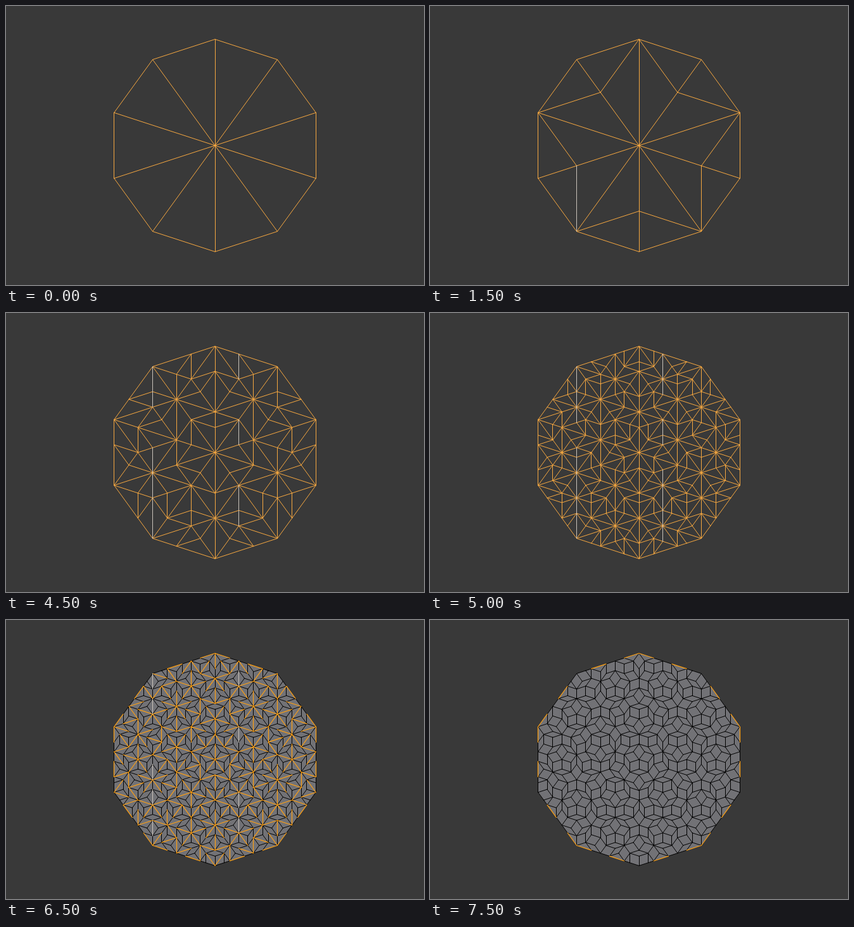
Animation of 660x440 px, one loop 8 s. Source, as an HTML page with a canvas:

```html
<!DOCTYPE html>
<html lang="en">
<head>
<meta charset="utf-8">
<title>Penrose tiling by triangle subdivision</title>
<style>
html, body { margin: 0; width: 100%; height: 100%; overflow: hidden; background: #393939; }
canvas { display: block; }
</style>
</head>
<body>
<canvas id="stage" width="660" height="440"></canvas>
<script>
const ctx = document.getElementById('stage').getContext('2d');
const PHI = (1 + Math.sqrt(5)) / 2;
const CX = 330, CY = 220, RADIUS = 167.5;
const LOOP = 8000;
const STARTS = [0, 1500, 3000, 4500, 5000, 5500, 6500, 7500];
const LAST_LEVEL = 5;
const BG = '#393939', WIRE = '#f5a740', PICK = '#ffa012', PALE = '#c9c2ba';
const FACE = '#727276', INK = '#000';

const rim = i => {
  const a = i * Math.PI / 5;
  return [CX + RADIUS * Math.sin(a), CY - RADIUS * Math.cos(a)];
};
const golden = (p, q) => [p[0] + (q[0] - p[0]) / PHI, p[1] + (q[1] - p[1]) / PHI];

// Triangles are [thick, apex, b, c]; b always lies on an odd spoke at first.
function wheel() {
  return Array.from({ length: 10 }, (_, i) => {
    const odd = i % 2 ? i : i + 1, even = i % 2 ? i + 1 : i;
    return [false, [CX, CY], rim(odd), rim(even)];
  });
}

function split([thick, a, b, c]) {
  if (!thick) {
    const p = golden(a, b);
    return [[false, c, p, b], [true, p, c, a]];
  }
  const q = golden(b, a), r = golden(b, c);
  return [[true, r, c, a], [true, q, r, b], [false, r, q, a]];
}

function edgesOf(tris) {
  const found = new Map();
  const add = (p, q, kind) => {
    const key = [p[0] + q[0], p[1] + q[1]].map(v => Math.round(v * 2 + 0.1)).join();
    const old = found.get(key);
    if (old) old.rim = false;
    else found.set(key, { p, q, kind, rim: true });
  };
  for (const [thick, a, b, c] of tris) {
    add(a, b, 'side');
    add(a, c, 'side');
    add(b, c, thick ? 'long' : 'short');
  }
  return [...found.values()];
}

const levels = [];
for (let n = 0, tris = wheel(); n <= LAST_LEVEL; n++, tris = tris.flatMap(split)) {
  levels.push(edgesOf(tris));
}

const isVertical = e => Math.abs(e.p[0] - e.q[0]) < 0.01;
const isPale = e => isVertical(e) &&
  [231.5, 367.6].some(x => Math.abs(e.p[0] - x) < 0.3);

function stroke(edges, color, width = 1) {
  ctx.beginPath();
  for (const e of edges) {
    const x = Math.floor(e.p[0] + 1e-6) + 0.5;
    const upright = isVertical(e);
    ctx.moveTo(upright ? x : e.p[0], e.p[1]);
    ctx.lineTo(upright ? x : e.q[0], e.q[1]);
  }
  ctx.strokeStyle = color;
  ctx.lineWidth = width;
  ctx.lineCap = 'round';
  ctx.stroke();
}

function strokeBright(edges, color, width) {
  stroke(edges.filter(e => !isPale(e)), color, width);
  stroke(edges.filter(isPale), PALE);
}

function fillDisc() {
  ctx.beginPath();
  for (let i = 0; i < 10; i++) ctx.lineTo(...rim(i));
  ctx.fillStyle = FACE;
  ctx.fill();
}

function draw(step) {
  ctx.fillStyle = BG;
  ctx.fillRect(0, 0, 660, 440);
  if (step <= LAST_LEVEL) {
    strokeBright(levels[step], WIRE);
    return;
  }
  // Short diagonals are already merged; the long ones are picked, then merged.
  const edges = levels[LAST_LEVEL];
  const merged = step > LAST_LEVEL + 1;
  fillDisc();
  stroke(edges.filter(e => e.kind === 'side' || (e.kind === 'short' && e.rim)), INK);
  strokeBright(edges.filter(e => e.kind === 'long' && (e.rim || !merged)), PICK, 1.2);
}

let shown = -1;
function tick(now) {
  const t = now % LOOP;
  const step = STARTS.filter(s => s <= t).length - 1;
  if (step !== shown) draw(shown = step);
  requestAnimationFrame(tick);
}
draw(shown = 0);
requestAnimationFrame(tick);
</script>
</body>
</html>
```
